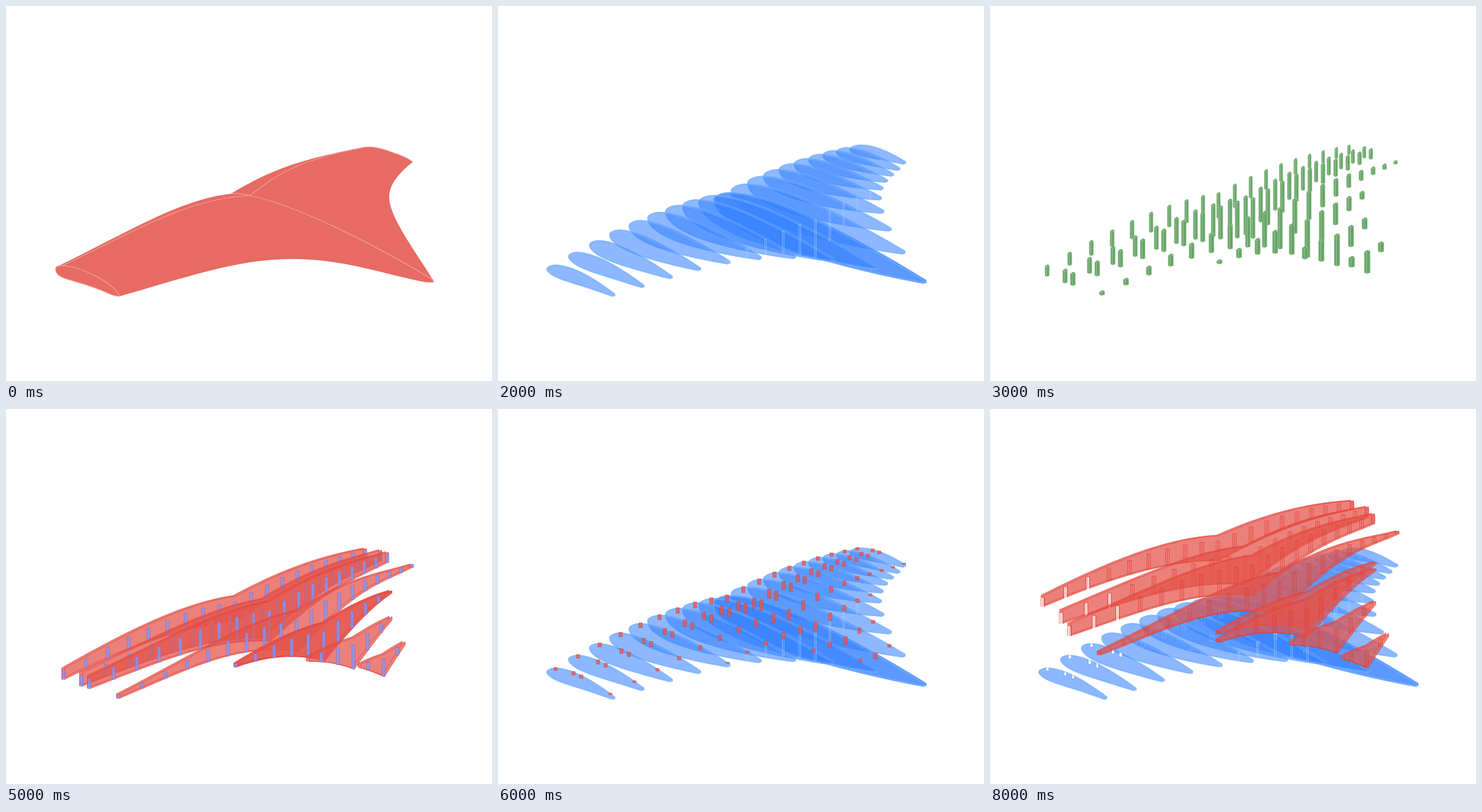
Recreate the animation shown at these times as an HTML page with a canvas. Size 804 px wide and 621 px high, loop 9 s.

```html
<!DOCTYPE html>
<html lang="en">
<head>
<meta charset="utf-8">
<title>Wing rib and spar assembly</title>
<style>
html, body { margin: 0; width: 100%; height: 100%; overflow: hidden; background: #fff; }
canvas { display: block; width: 804px; height: 621px; }
</style>
</head>
<body>
<canvas id="stage" width="804" height="621"></canvas>
<script>
const W = 804, H = 621, ROOT = 9, LAST = 18, SLOT = 0.25;
const BLUE = 'rgba(52,128,255,.56)', BLUE_LINE = 'rgba(126,181,255,.9)';
const RED = 'rgba(229,85,76,.74)', RED_LINE = 'rgba(228,58,48,.9)';
const ctx = document.getElementById('stage').getContext('2d');

// Leading and trailing edge: a few points, evenly spaced along each half of the span
const nose = { at: [0, 4, 9, 14, 18], x: [82, 218, 359, 491, 583], y: [435, 363, 318, 261, 237] };
const tail = { at: [0, 3, 6, 9, 12, 15, 18], x: [192, 334, 491, 707, 637, 643, 673],
  y: [479, 436, 416, 457, 341, 290, 260] };
const sparOffsets = [19, 64, 76, 121, 166, 215, 265];
const layers = [0, 1, 2, 3, 4, 4, 5, 6];

// Polynomial through the points of one half wing
function along(edge, j, axis) {
  const mid = (edge.at.length - 1) / 2;
  const part = list => j <= ROOT ? list.slice(0, mid + 1) : list.slice(mid);
  const at = part(edge.at), values = part(edge[axis]);
  return at.reduce((sum, a, i) => sum + at.reduce(
    (p, b) => b === a ? p : p * (j - b) / (a - b), values[i]), 0);
}

function chordOf(j) {
  const x = along(nose, j, 'x'), y = along(nose, j, 'y');
  return { x, y, c: along(tail, j, 'x') - x, drop: along(tail, j, 'y') - y };
}

// Upper and lower surface of rib j at the chord fraction u
function section(j, u) {
  const { x, y, c, drop } = chordOf(j), t = Math.abs(j - ROOT) / ROOT;
  const shape = 10 * (.2969 * Math.sqrt(u) - .126 * u - .3516 * u ** 2 + .2843 * u ** 3 - .1015 * u ** 4);
  const half = c * shape * (.097 + .016 * Math.sin(Math.PI * t)) + 1.6 * u;
  const camber = .045 * Math.sin(Math.PI * u) * t ** 3 - .03 * u ** .2 * (1 - u) ** 4 * (1 - t * t);
  const mid = y + drop * u - c * camber;
  return { x: x + c * u, top: mid - half, bottom: mid + half };
}

function sparOffset(k, j) {
  const d = sparOffsets[k], t = Math.abs(j - ROOT);
  const skew = Math.max(0, d - 64) / 300 * Math.sign(j - ROOT);
  return d - Math.min(1, d / 64) * (1 + skew) * (j < ROOT ? .27 * t * t : 3.1 * t);
}
const station = (k, j) => section(j, Math.min(1, sparOffset(k, j) / chordOf(j).c));

const steps = Array.from({ length: LAST * 4 + 1 }, (_, i) => i / 4);
const spars = sparOffsets.map((_, k) => steps
  .filter(j => sparOffset(k, j) < chordOf(j).c + 1)
  .map(j => ({ j, k, ...station(k, j) })));
const posts = spars.flat().filter(p => p.j % 1 === 0 && sparOffset(p.k, p.j) < chordOf(p.j).c - 1)
  .map(p => ({ ...p, top: p.top - 1.5, bottom: p.bottom + 1,
    w: Math.min(p.bottom - p.top + 4, 7 + p.k * .6 - p.j / 9) }));

function trace(points, close = true) {
  const path = new Path2D();
  points.forEach(p => path.lineTo(...p));
  if (close) path.closePath();
  return path;
}
const outline = pts => trace([...pts.map(p => [p.x, p.top]), ...pts.map(p => [p.x, p.bottom]).reverse()]);

function thicken(path, dx, dy) {
  const both = new Path2D();
  for (const k of [-1, 1]) both.addPath(path, { e: k * dx, f: k * dy });
  return both;
}

const ribs = Array.from({ length: LAST + 1 }, (_, j) => {
  const pts = Array.from({ length: 41 }, (_, i) => section(j, (1 - Math.cos(Math.PI * i / 40)) / 2));
  return thicken(outline(pts), 1.5, -.6);
});

function makeLayer(draw) {
  const c = document.createElement('canvas');
  c.width = W; c.height = H;
  draw(c.getContext('2d'));
  ctx.drawImage(c, 0, 0);
}

function paint(g, path, fill, line, width = .8) {
  if (fill) { g.fillStyle = fill; g.fill(path); }
  if (line) { g.strokeStyle = line; g.lineWidth = width; g.stroke(path); }
}

function drawRibs(g) {
  for (let j = LAST; j >= 0; j--) {
    if (j === ROOT) paint(g, ribs[j], BLUE);
    paint(g, ribs[j], BLUE, BLUE_LINE, 1);
  }
  g.strokeStyle = 'rgba(165,208,255,.85)';
  g.lineWidth = .8;
  for (const p of posts) {
    if (p.k === 4) g.strokeRect(p.x - 1.2, p.top + 2, 2.6, p.bottom - p.top - 3);
  }
}

const sparBody = pts => thicken(outline(pts), 2.5, .4);

function drawSpars(withPosts) {
  for (const k of layers) {
    paint(ctx, sparBody(spars[k]), RED, RED_LINE);
    if (withPosts) drawHalfPosts(posts.filter(p => p.k === k), false, 'rgba(125,152,250,.8)', 'rgba(190,85,140,.7)');
  }
}

function drawSkin(fill, line) {
  paint(ctx, new Path2D(`M82 435 Q82 431 86 431 C210 370 290 320 372 311 C440 270 490 253 592 234
    Q610 231 638 242 C654 247 665 252 673 258 C645 281 634 298 634 317 C634 350 680 410 708 456
    Q706 460 692 457 C620 443 560 419 472 419 C380 419 290 452 187 481 Q181 482 163 473
    C135 461 118 458 97 451 Q82 446 82 435Z`), fill);
  paint(ctx, new Path2D(`M188 480 Q181 482 163 473 C135 461 118 458 97 451 Q82 446 82 435 Q82 431 90 430
    C120 429 178 458 188 480 M93 430 C210 375 300 318 403 314 M372 311 Q385 309 403 314
    C480 329 610 395 706 453 Q709 459 692 457 M403 314 C450 278 480 256 592 234
    Q610 231 638 242 C654 247 665 252 673 258`), null, line, 1.2);
}

function drawPosts() {
  for (const p of posts) {
    const r = p.w / 2, d = Math.min(3, (p.bottom - p.top) / 3);
    const l = p.x - r, q = p.x + r, m = p.x - r * .25;
    const ridge = [[l, p.top + d], [m, p.top + d * 1.4], [q, p.top + d * .6]];
    const box = trace([ridge[0], [p.x + 1, p.top], ridge[2],
      [q, p.bottom - d * .5], [m, p.bottom], [l, p.bottom - d * .6]]);
    paint(ctx, box, '#68a468', '#9cc99c', .7);
    paint(ctx, trace(ridge, false), null, '#a9d3a9');
    paint(ctx, trace([ridge[1], [m, p.bottom]], false), null, '#a9d3a9');
  }
}

function drawHalfPosts(list, upper, fill, line) {
  for (const p of list) {
    const cut = p.top + (p.bottom - p.top) * SLOT;
    const box = new Path2D();
    box.rect(p.x - 2, upper ? p.top : cut, 5.5, upper ? cut - p.top : p.bottom - cut);
    paint(ctx, box, fill, line, .7);
  }
}

function drawAssembly() {
  drawRibs(ctx);
  ctx.strokeStyle = 'rgba(165,85,190,.55)';
  ctx.lineWidth = .7;
  for (const p of posts) ctx.strokeRect(p.x - 2, p.top, 4, p.bottom - p.top);
  makeLayer(g => {
    for (let j = LAST; j >= 0; j--) {
      for (const k of layers) {
        const bay = spars[k].filter(p => p.j >= j && p.j <= j + 1);
        if (bay.length > 1) paint(g, outline(bay), 'rgba(226,46,38,.68)', RED_LINE, .7);
      }
      // The nearer rib hides what stands behind it
      g.globalCompositeOperation = 'destination-out';
      paint(g, ribs[j], 'rgba(0,0,0,.9)');
      g.globalCompositeOperation = 'source-over';
    }
    for (const s of spars) paint(g, trace(s.map(p => [p.x, p.top + .8]), false), null, RED_LINE, 1.8);
  });
}

function drawExploded() {
  makeLayer(g => {
    drawRibs(g);
    g.strokeStyle = BLUE_LINE;
    for (const p of posts) {
      const h = (p.bottom - p.top) * SLOT;
      if (p.j < 3 && p.k < 3) g.clearRect(p.x - 1.5, p.top, 3.5, h);
      g.strokeRect(p.x - 2, p.top + 1, 5, h);
    }
  });
  layers.forEach((k, level) => {
    const lift = 100 - 12.3 * level;
    const raise = p => {
      const out = p.j - ROOT, dy = out * lift * lift * .00023 - lift;
      return { ...p, x: p.x + out * lift * .007 - 1, top: p.top + dy, bottom: p.bottom + dy };
    };
    makeLayer(g => {
      paint(g, sparBody(spars[k].map(raise)), RED, RED_LINE);
      for (const p of posts.filter(q => q.k === k).map(raise)) {
        const h = p.bottom - p.top, cut = p.top + h * SLOT;
        if (k < 3 && p.j < 3) g.clearRect(p.x - (p.j ? 2 : 6), cut, p.j ? 4 : 8, h);
        paint(g, trace([[p.x - 3, p.bottom], [p.x - 3, cut], [p.x + 3, cut], [p.x + 3, p.bottom]], false), null, RED_LINE);
        paint(g, trace([[p.x, cut], [p.x, p.bottom]], false), null, RED_LINE);
      }
    });
  });
}

const scenes = [
  () => drawSkin('#e76b62', '#eea39d'),
  () => {
    drawSkin('rgba(231,107,98,.4)', '#eea39d');
    ribs.forEach(r => paint(ctx, r, null, BLUE_LINE, 1));
  },
  () => drawRibs(ctx),
  drawPosts,
  () => drawSpars(false),
  () => drawSpars(true),
  () => {
    drawRibs(ctx);
    drawHalfPosts(posts, true, RED, RED_LINE);
  },
  drawAssembly,
  drawExploded
];

let shown = -1;
function tick() {
  const scene = Math.floor(performance.now() % 9000 / 1000);
  if (scene !== shown) {
    shown = scene;
    ctx.fillStyle = '#fff';
    ctx.fillRect(0, 0, W, H);
    ctx.lineJoin = 'round';
    scenes[scene]();
  }
  requestAnimationFrame(tick);
}
tick();
</script>
</body>
</html>
```
